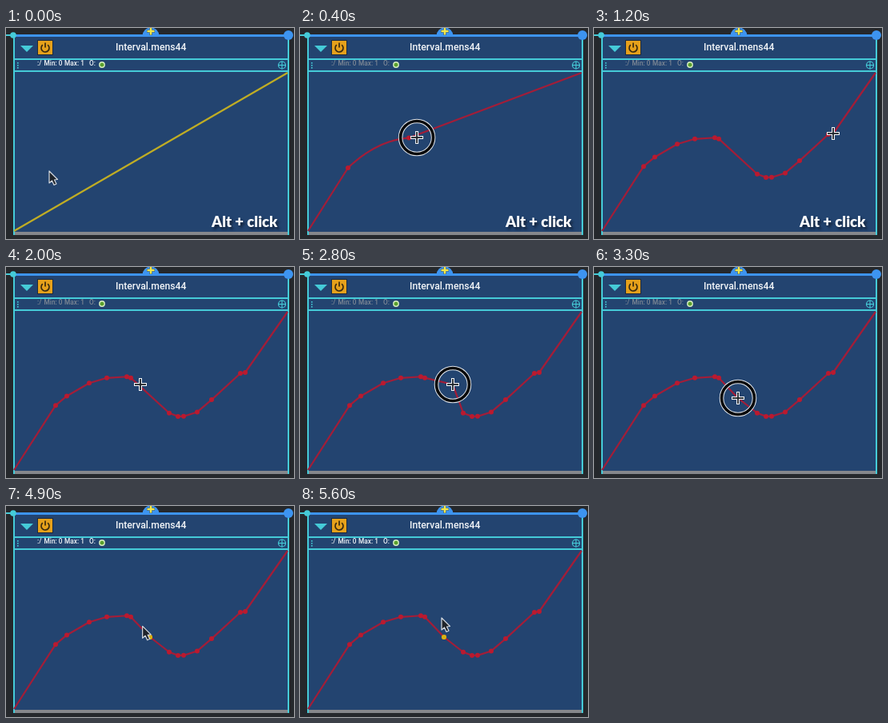
Recreate the animation shown at these times as an HTML page with a canvas. Size 360x264 px, loop 6000 ms.

```html
<!DOCTYPE html>
<html lang="en">
<head>
<meta charset="utf-8">
<title>Curve editor</title>
<style>
html, body { margin: 0; width: 100%; height: 100%; overflow: hidden; background: #25282c; }
canvas { display: block; }
</style>
</head>
<body>
<canvas id="stage" width="360" height="264"></canvas>
<script>
const ctx = document.getElementById('stage').getContext('2d');
const LOOP = 6000, STEP = 100;
const CYAN = '#45cbd8', BLUE = '#3d94f0', RED = '#a31d38', DOT = '#ba1a2f', YELLOW = '#c0ad24';
const DARK = '#1f242b', WHITE = '#f2f5f8';
const START = { x: 10, y: 254 }, END = { x: 352, y: 56 };
const PEN_FROM = 60, PEN_TO = 299, PEN_SPEED = 0.287;
const DRAW_AT = 100, DRAW_END = 1200, GRAB_AT = 2200, DROP_AT = 4000, ARROW_AT = 4600;
const KNOT_X = [62, 76, 104, 126, 151, 156, 204, 215, 222, 239, 257, 293, 299];

const clamp = v => Math.min(1, Math.max(0, v));
const ease = s => (1 - Math.cos(Math.PI * s)) / 2;

// The drawn wave: rise to a crest, dip to a trough, rise again
function wave(x) {
  let y;
  if (x < 148) y = 137 + 38 * ((148 - x) / 88) ** 2.2;
  else if (x < 217) y = 137 + 50 * ease((x - 148) / 69);
  else y = 187 - 55 * ease(((x - 217) / 82) ** 1.2);
  return { x, y };
}

const KNOTS = KNOT_X.map(wave);
const HANDLE = { x: 180, y: 164 };
const MOVES = [
  { from: 1300, to: 2000, x: 168, y: 147 },
  { from: GRAB_AT, to: 2800, x: 191, y: 147 },
  { from: 2800, to: 3300, ...HANDLE },
  { from: DROP_AT, to: 4300, x: 169, y: 153 },
  { from: ARROW_AT, to: 5600, x: 177, y: 140 }
];

const penAt = t => wave(Math.min(PEN_TO, PEN_FROM + Math.max(0, t - DRAW_AT) * PEN_SPEED));

function pointerAt(t) {
  if (t < DRAW_AT) return { x: 54, y: 179 };
  const pos = penAt(t);
  for (const m of MOVES) {
    const p = ease(clamp((t - m.from) / (m.to - m.from)));
    pos.x += (m.x - pos.x) * p;
    pos.y += (m.y - pos.y) * p;
  }
  return pos;
}

function rect(x, y, w, h, fill) {
  ctx.fillStyle = fill;
  ctx.fillRect(x, y, w, h);
}

function paint(fill, stroke, width) {
  if (fill) { ctx.fillStyle = fill; ctx.fill(); }
  if (stroke) { ctx.strokeStyle = stroke; ctx.lineWidth = width; ctx.stroke(); }
}

function circle(x, y, r, fill, stroke, width) {
  ctx.beginPath();
  ctx.arc(x, y, r, 0, Math.PI * 2);
  paint(fill, stroke, width);
}

function line(points, color) {
  ctx.beginPath();
  points.forEach(p => ctx.lineTo(p.x, p.y));
  ctx.lineJoin = 'round';
  paint(null, color, 2.2);
}

function plus(x, y, arm, width, color) {
  rect(x - arm, y - width / 2, arm * 2, width, color);
  rect(x - width / 2, y - arm, width, arm * 2, color);
}

function text(str, x, y, font, color) {
  ctx.font = font;
  ctx.fillStyle = color;
  ctx.fillText(str, x, y);
}

function drawPanel(dim) {
  rect(0, 0, 360, 264, '#25282c');
  rect(9, 9, 344, 250, '#234470');
  rect(10, 255, 343, 4, '#85878b');
  for (const y of [38, 53]) rect(9, y, 344, 2, CYAN);
  for (const x of [9, 352]) rect(x, 9, 2, 250, CYAN);
  rect(0, 8, 9, 2, CYAN);
  rect(9, 8, 344, 3, BLUE);
  circle(9, 9, 3.8, CYAN);
  circle(353, 9, 6, BLUE);

  ctx.beginPath();
  ctx.arc(181, 10, 10.5, Math.PI, 0);
  paint(BLUE);
  plus(181, 4, 5, 4, '#38668f');
  plus(181, 4, 4.5, 2.4, '#f3e84a');

  ctx.fillStyle = CYAN;
  ctx.fill(new Path2D('M18 22H34L26 30Z'));
  rect(39, 15, 20, 19, '#1d2b3e');
  rect(40, 16, 18, 17, '#e6a11b');
  ctx.beginPath();
  ctx.arc(49, 25, 5, -0.9, Math.PI + 0.9);
  paint(null, '#3a2a10', 1.7);
  rect(48.2, 18.5, 1.7, 6, '#3a2a10');
  text('Interval.mens44', 137, 28, '500 12.2px Roboto, sans-serif', WHITE);

  for (const y of [43, 46, 49]) rect(14, y, 1.6, 1.6, CYAN);
  const label = (str, x) => text(str, x, 47, '500 8.3px Roboto, sans-serif', dim ? '#7d8794' : WHITE);
  label(':/', 39);
  label('Min: 0', 47.5);
  label('Max: 1', 73);
  label('O:', 104);
  circle(120, 46, 3.2, '#5aa02c', '#d9f0c4', 1.4);
  circle(345, 46.5, 4.5, null, CYAN, 1.2);
  plus(345, 46.5, 5, 1.1, CYAN);
}

function drawCurve(t, pointer) {
  if (t < DRAW_AT) return line([START, END], YELLOW);
  let points, dots;
  if (t < DRAW_END) {
    const tip = penAt(t - 35);
    points = [];
    for (let x = PEN_FROM; x < tip.x; x += 2) points.push(wave(x));
    points.push(tip);
    dots = [points[0], tip];
  } else {
    points = dots = KNOTS.slice();
    if (t >= GRAB_AT) points.splice(6, 0, t < DROP_AT ? pointer : HANDLE);
  }
  line([START, ...points, END], RED);
  for (const p of dots) circle(p.x, p.y, 3, DOT);
  if (t >= DROP_AT) circle(HANDLE.x, HANDLE.y, 3.1, '#d8b212');
}

function drawPointer(t, { x, y }) {
  if (t < DRAW_AT || t >= ARROW_AT) {
    ctx.save();
    ctx.translate(x, y);
    const arrow = new Path2D('M0 0V15L3.5 12L6 17.5L9 16L6.5 11L10.5 10.5Z');
    ctx.fillStyle = DARK;
    ctx.fill(arrow);
    ctx.strokeStyle = '#d5dae0';
    ctx.lineWidth = 1.2;
    ctx.stroke(arrow);
    ctx.restore();
    return;
  }
  if (t < DRAW_END || (t >= GRAB_AT && t < DROP_AT)) {
    circle(x, y, 20.5, null, '#dfe3e8', 5.6);
    circle(x, y, 20.5, null, '#08090b', 3.6);
  }
  plus(x, y, 8, 4, WHITE);
  plus(x, y, 7, 1.8, DARK);
}

function drawCaption() {
  ctx.save();
  ctx.shadowColor = '#14243c';
  ctx.shadowOffsetX = ctx.shadowOffsetY = 2.5;
  ctx.shadowBlur = 3;
  text('Alt + click', 257, 249, '900 18.5px Lato, sans-serif', '#fff');
  ctx.restore();
}

function tick() {
  const t = Math.floor((performance.now() - begin) % LOOP / STEP) * STEP;
  const pointer = pointerAt(t);
  drawPanel(t >= DRAW_AT && t < 4300);
  drawCurve(t, pointer);
  if (t < 1400) drawCaption();
  drawPointer(t, pointer);
  requestAnimationFrame(tick);
}

const begin = performance.now();
tick();
</script>
</body>
</html>
```
